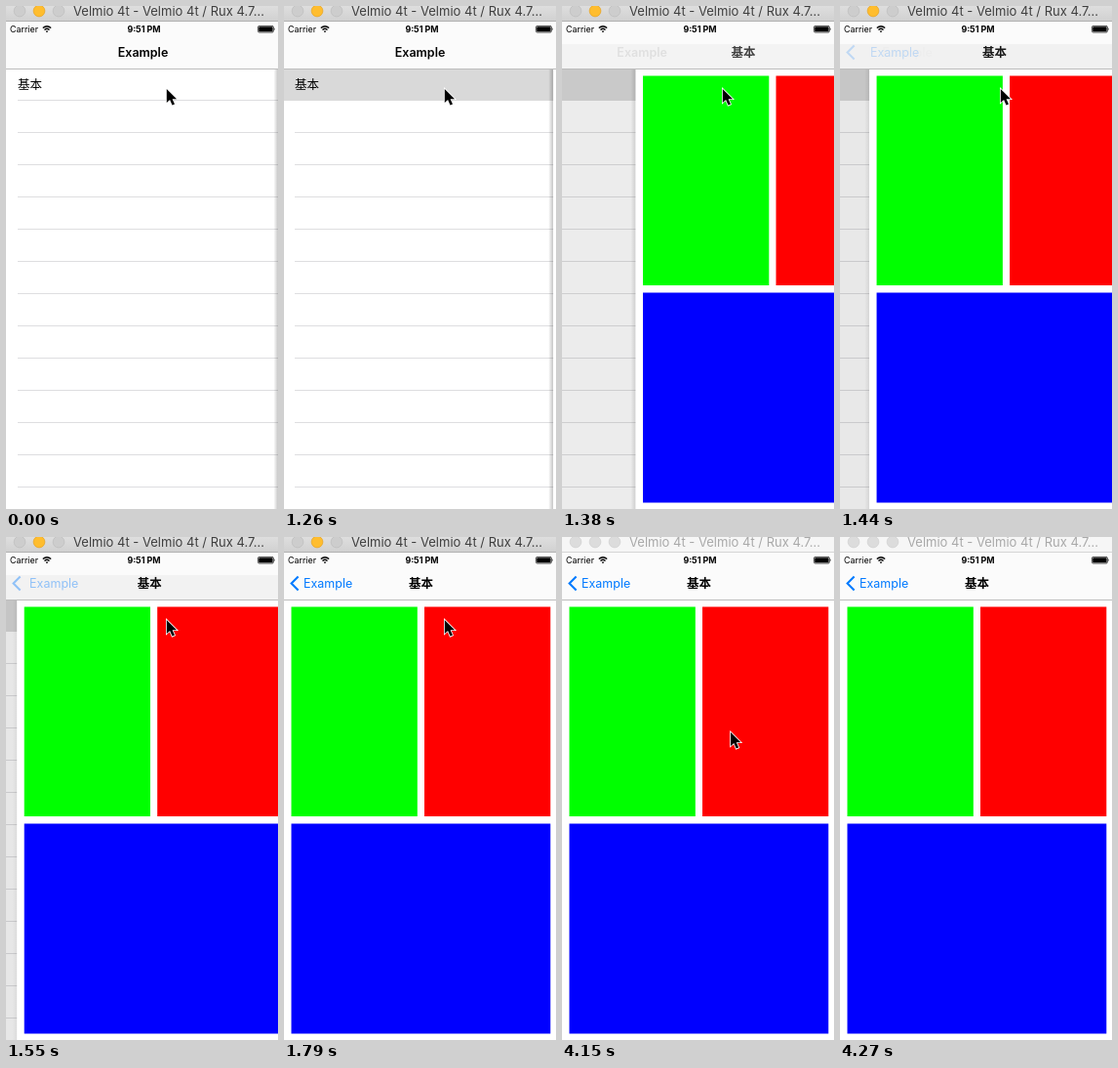
Write an HTML page that moves like this. It is 279 px wide and 515 px high and loops after 5310 ms.

```html
<!DOCTYPE html>
<html lang="en">
<head>
<meta charset="utf-8">
<title>Push transition</title>
<style>
  html, body { margin: 0; width: 100%; height: 100%; overflow: hidden; background: #fff; }
  svg { display: block; width: 279px; height: 515px; }
  text { font: 12.5px Inter, "Noto Sans CJK SC", "Noto Sans CJK", sans-serif; white-space: pre; }
  .title { font-weight: 600; text-anchor: middle; }
  .status { font-size: 8.9px; }
  .time { font-weight: 700; text-anchor: middle; }
  .caption { font-size: 13px; }
  .tint { fill: #007aff; }
  .window { --bar: url(#chrome); --edge: #b1b1b1; --ink: #3f3f3f; --dot: #cdcdcd; --rim: #bdbdbd; --amber: #ffbd2e; --amberRim: #e5a323; }
  .window.inactive { --bar: #f6f6f6; --edge: #d5d5d5; --ink: #a9a9a9; --dot: #dcdcdc; --rim: #d0d0d0; --amber: #dcdcdc; --amberRim: #d0d0d0; }
</style>
</head>
<body>
<svg viewBox="0 0 279 515">
  <defs>
    <linearGradient id="chrome" x2="0" y2="1">
      <stop stop-color="#dedede"/><stop offset="1" stop-color="#d0d0d0"/>
    </linearGradient>
    <linearGradient id="shade">
      <stop stop-opacity="0"/><stop offset="1" stop-opacity=".24"/>
    </linearGradient>
  </defs>

  <rect width="279" height="515" fill="#fff"/>
  <g id="list">
    <path id="rules" stroke="#dedee0" fill="none"/>
    <rect id="selected" y="64" width="281" height="33" fill="#d9d9d9"/>
    <text x="12" y="84.6">基本</text>
  </g>
  <rect id="dim" y="65" width="279" height="450"/>

  <g id="page">
    <rect id="shadow" x="-5" y="65" width="5" height="450" fill="url(#shade)"/>
    <rect y="65" width="281" height="450" fill="#fff"/>
    <rect x="7.5" y="71.5" width="129.3" height="214.5" fill="#0f0"/>
    <rect x="144" y="71.5" width="129.3" height="214.5" fill="#f00"/>
    <rect x="7.5" y="293.5" width="265.8" height="215" fill="#00f"/>
  </g>

  <rect y="16" width="279" height="49" fill="#fbfbfb"/>
  <rect id="navDim" y="39" width="279" height="26"/>
  <path d="M0 64.5H279" stroke="#bdbdbd"/>
  <text id="oldTitle" class="title" y="52">Example</text>
  <text id="newTitle" class="title" y="52">基本</text>
  <g id="back">
    <path d="M14.6 40.6L7.6 47.6L14.6 54.6" fill="none" stroke="#007aff" stroke-width="2.1"/>
    <text id="backLabel" class="tint" y="52">Example</text>
  </g>

  <text class="status" x="4" y="27">Carrier</text>
  <g fill="none" stroke="#000" stroke-width="1.4">
    <path d="M37.8 22.6Q42 18.8 46.2 22.6M39.5 24.5Q42 22.2 44.5 24.5"/>
  </g>
  <path d="M40.7 25.7Q42 24.7 43.3 25.7L42 27.2Z"/>
  <text class="status time" x="141.5" y="27">9:51 PM</text>
  <rect x="258.4" y="20.4" width="16" height="6.6" rx="1.4" fill="none" stroke="#000" stroke-width=".7"/>
  <rect x="259.2" y="21.2" width="14.4" height="5" rx=".7"/>
  <path d="M275.2 22.3q1.3 1.4 0 2.8z"/>

  <g id="window" class="window">
    <rect width="279" height="16" fill="var(--bar)"/>
    <path d="M0 15.5H279" stroke="var(--edge)"/>
    <g fill="var(--dot)" stroke="var(--rim)" stroke-width=".7">
      <circle cx="14" cy="5" r="5.9"/>
      <circle cx="34" cy="5" r="5.9" fill="var(--amber)" stroke="var(--amberRim)"/>
      <circle cx="54" cy="5" r="5.9"/>
    </g>
    <text class="caption" x="69" y="10" fill="var(--ink)">Velmio 4t - Velmio 4t / Rux 4.7...</text>
  </g>

  <path id="cursor" d="M0 0V14L3.3 11L5.7 16.6L8.2 15.5L5.8 10.2H10.3Z" stroke="#fff" stroke-width="1.6" paint-order="stroke"/>
</svg>
<script>
const LOOP = 5310, PUSH = 1260, SETTLED = 1790, BLUR = 3970, LEAVE = 4150, STEP = 60;
const $ = id => document.getElementById(id);
const clamp = v => Math.min(1, Math.max(0, v));
const move = (id, x, y = 0) => $(id).setAttribute('transform', `translate(${x} ${y})`);
const fade = (id, v) => $(id).setAttribute('opacity', v);

$('rules').setAttribute('d',
  Array.from({ length: 13 }, (_, i) => `M12 ${96.5 + 33 * i}H281`).join(''));

// Remaining distance of a critically damped spring, 1 to 0
function remaining(t) {
  if (t < PUSH) return 1;
  if (t >= SETTLED) return 0;
  const x = 0.0202 * (t - PUSH + 8);
  return (1 + x) * Math.exp(-x);
}

function cursorAt(t) {
  if (t < LEAVE) return [164.8, 85];
  return t < LEAVE + STEP ? [173, 200] : [190.5, 422];
}

function render(time) {
  const t = time < PUSH || time >= SETTLED
    ? time : PUSH + Math.floor((time - PUSH) / STEP) * STEP;
  const p = remaining(t), done = 1 - p;

  move('list', -84 * done);
  fade('selected', t >= PUSH ? 1 : 0);
  fade('dim', 0.1 * done);
  move('page', 279.5 * p);
  fade('shadow', Math.sqrt(p));

  fade('navDim', 0.045 * done * (1 - clamp((t - 1440) / 350)));
  move('oldTitle', 140.5 - 80 * done);
  fade('oldTitle', p * p);
  move('newTitle', 140.5 + 168 * p);
  fade('newTitle', done);
  move('backLabel', 20 + 102 * p);
  fade('back', clamp((t - 1380) / 300));

  $('window').classList.toggle('inactive', t >= BLUR);
  move('cursor', ...cursorAt(t));
  fade('cursor', t < LEAVE + 2 * STEP ? 1 : 0);
}

const start = performance.now();
function tick() {
  render((performance.now() - start) % LOOP);
  requestAnimationFrame(tick);
}
tick();
</script>
</body>
</html>
```
